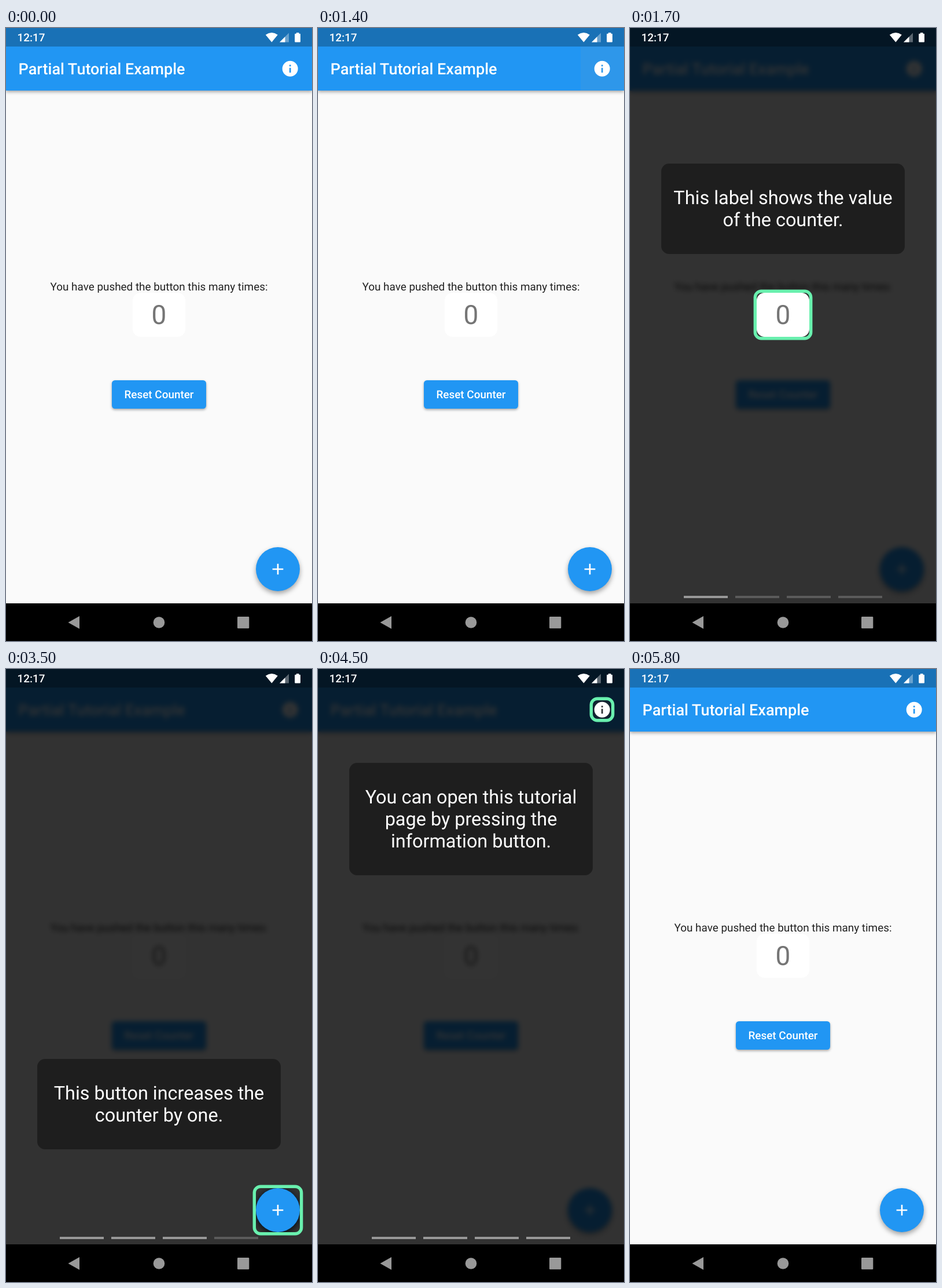
An HTML page that plays this animation: 529x1058 px, repeating every 6800 ms.

```html
<!DOCTYPE html>
<html lang="en">
<head>
<meta charset="utf-8">
<title>Counter tutorial</title>
<style>
  html, body { margin: 0; width: 100%; height: 100%; overflow: hidden; background: #fafafa; }
  body { font: 18.9px Roboto, Arial, sans-serif; text-rendering: geometricPrecision; }
  div, svg { position: absolute; box-sizing: border-box; }
  svg { display: block; overflow: visible; }
  .stage { left: 0; top: 0; width: 529px; height: 1058px; overflow: hidden; background: #fafafa; }

  /* App screen */
  .bar { left: 0; top: 0; width: 529px; height: 107.6px; background: #2196f3; box-shadow: 0 2px 6px rgba(0,0,0,.38); }
  .press { left: 454px; top: 32px; width: 75px; height: 75.6px; background: #2e97ea; }
  .title { left: 21.6px; top: 50.6px; font-size: 27px; font-weight: 500; line-height: 40px; color: #fff; white-space: nowrap; }
  .label { left: 0; top: 436px; width: 529px; line-height: 22px; text-align: center; color: rgba(0,0,0,.87); }
  .card { left: 219px; top: 457px; width: 91px; height: 76px; border-radius: 13.5px; background: #fff;
          font-size: 45.9px; line-height: 78px; text-align: center; color: #757575; }
  .reset { left: 183px; top: 608.4px; width: 163px; height: 48.6px; border-radius: 5.4px; background: #2196f3;
           font-weight: 500; line-height: 49.6px; text-align: center; color: #fff; box-shadow: 0 2px 4px rgba(0,0,0,.34); }
  .fab { left: 432px; top: 896px; width: 76px; height: 76px; border-radius: 50%; background: #2196f3;
         box-shadow: 0 4px 9px rgba(0,0,0,.36); }
  .icon { width: 32.4px; height: 32.4px; fill: #fff; }
  .fab .icon { left: 22px; top: 22px; width: 32px; height: 32px; }
  .info { left: 475px; top: 54px; }

  /* Tutorial layer */
  .veil { left: 0; top: 0; width: 529px; height: 993.5px; background: rgba(0,0,0,.8);
          -webkit-backdrop-filter: blur(4px); backdrop-filter: blur(4px); }
  .step { left: 0; top: 0; width: 529px; height: 994px; }
  .tip { left: 54px; width: 421px; padding: 41px 0 39px; border-radius: 13.5px; background: rgba(0,0,0,.4);
         font-size: 32.4px; line-height: 37.95px; text-align: center; color: #fff; white-space: nowrap; }
  .ring { box-shadow: 0 0 0 5.4px #69f0ae; border-radius: 8.1px; overflow: hidden; }
  .ring > * { left: 0; top: 0; }
  .ring .reset { height: 65px; line-height: 66px; box-shadow: none; }
  .dash { left: 93px; top: 979.8px; height: 4.1px; width: 342.9px;
          background: repeating-linear-gradient(90deg, var(--c) 0 75.6px, transparent 75.6px 89.1px); }
  .rest { --c: #5b5b5b; }
  .done { --c: #989898; width: calc(var(--n) * 89.1px - 13.5px); }

  /* System bars */
  .status { left: 0; top: 0; width: 529px; height: 32.4px; background: rgba(0,0,0,.25); color: #fff; }
  .clock { left: 19.5px; top: 6px; line-height: 22px; font-weight: 500; }
  .nav { left: 0; top: 993px; width: 529px; height: 65px; background: #000; }

  /* Hard cuts on a 6.8 s loop */
  .press, .veil, .step { visibility: hidden; animation: 6.8s step-end infinite; }
  .press { animation-name: press; }
  .veil { animation-name: veil; }
  .s1 { --n: 1; animation-name: s1; }
  .s2 { --n: 2; animation-name: s2; }
  .s3 { --n: 3; animation-name: s3; }
  .s4 { --n: 4; animation-name: s4; }
  @keyframes press { 0%, 24.99% { visibility: hidden } 20.58% { visibility: visible } }
  @keyframes veil { 0%, 85.29% { visibility: hidden } 24.99% { visibility: visible } }
  @keyframes s1 { 0%, 38.23% { visibility: hidden } 24.99% { visibility: visible } }
  @keyframes s2 { 0%, 51.47% { visibility: hidden } 38.23% { visibility: visible } }
  @keyframes s3 { 0%, 64.7% { visibility: hidden } 51.47% { visibility: visible } }
  @keyframes s4 { 0%, 85.29% { visibility: hidden } 64.7% { visibility: visible } }
</style>
</head>
<body>
<svg width="0" height="0">
  <defs>
    <symbol id="plus" viewBox="0 0 24 24"><path d="M19 13h-6v6h-2v-6H5v-2h6V5h2v6h6z"/></symbol>
    <symbol id="info" viewBox="0 0 24 24">
      <path fill-rule="evenodd" d="M12 2a10 10 0 1 0 0 20a10 10 0 1 0 0-20zM11 7h2v2h-2zM11 11h2v6h-2z"/>
    </symbol>
  </defs>
</svg>

<div class="stage">
  <div class="bar">
    <div class="press"></div>
    <div class="title">Partial Tutorial Example</div>
    <svg class="icon info"><use href="#info"/></svg>
  </div>
  <div class="label">You have pushed the button this many times:</div>
  <div class="card">0</div>
  <div class="reset">Reset Counter</div>
  <div class="fab"><svg class="icon"><use href="#plus"/></svg></div>

  <div class="veil"></div>

  <div class="step s1">
    <div class="tip" style="top:234px">This label shows the value<br>of the counter.</div>
    <div class="ring" style="left:219px;top:457px;width:91px;height:76px"><div class="card">0</div></div>
    <div class="dash rest"></div><div class="dash done"></div>
  </div>
  <div class="step s2">
    <div class="tip" style="top:339px">This button decreases the<br>value of the counter to<br>zero.</div>
    <div class="ring" style="left:183px;top:600px;width:163px;height:65px"><div class="reset">Reset Counter</div></div>
    <div class="dash rest"></div><div class="dash done"></div>
  </div>
  <div class="step s3">
    <div class="tip" style="top:673px">This button increases the<br>counter by one.</div>
    <div class="ring" style="left:432px;top:896px;width:76px;height:76px">
      <div class="fab"><svg class="icon"><use href="#plus"/></svg></div>
    </div>
    <div class="dash rest"></div><div class="dash done"></div>
  </div>
  <div class="step s4">
    <div class="tip" style="top:161.7px">You can open this tutorial<br>page by pressing the<br>information button.</div>
    <div class="ring" style="left:475px;top:54px;width:32.4px;height:32.4px">
      <svg class="icon"><use href="#info"/></svg>
    </div>
    <div class="dash rest"></div><div class="dash done"></div>
  </div>

  <div class="status">
    <div class="clock">12:17</div>
    <svg width="529" height="32" fill="#fff">
      <path d="M448.8 11.8Q459.3 4.4 469.8 11.8L459.3 24.6z"/>
      <path d="M489 8.5V24.5H473z" opacity=".35"/>
      <path d="M482.5 15V24.5H473z"/>
      <path d="M502 8h4.4v1.8h1.6q1 0 1 1V23.6q0 1-1 1h-7.8q-1 0-1-1V10.8q0-1 1-1h1.8z"/>
    </svg>
  </div>
  <div class="nav">
    <svg width="529" height="65" fill="#999">
      <path d="M107.5 33L127 22V44z"/>
      <circle cx="264.5" cy="33" r="9.8"/>
      <rect x="400" y="23" width="20.3" height="20.3" rx="1.3"/>
    </svg>
  </div>
</div>
</body>
</html>
```
